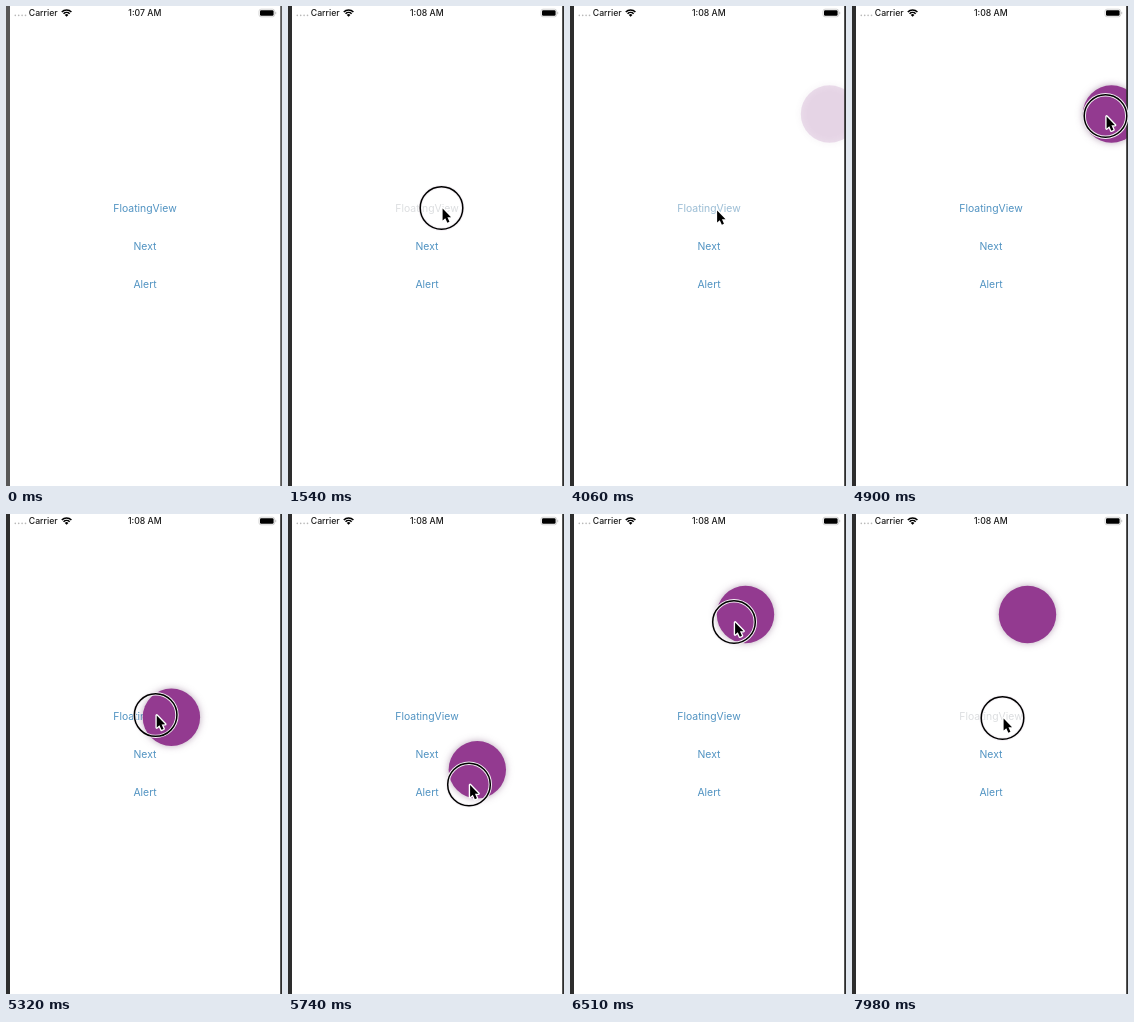
An HTML page with a canvas that plays this animation: 276 px wide and 480 px high, repeating every 8000 ms.

```html
<!DOCTYPE html>
<html lang="en">
<head>
<meta charset="utf-8">
<title>Floating button demo</title>
<style>
  html, body { margin: 0; width: 100%; height: 100%; overflow: hidden; background: #fff; }
  canvas { display: block; width: 276px; height: 480px; }
</style>
</head>
<body>
<canvas id="stage"></canvas>
<script>
const W = 276, H = 480, LOOP = 8000, STEP = 70;
const FONT = 'Inter, "Liberation Sans", sans-serif';
const BLUE = '#5193c2';
const canvas = document.getElementById('stage');
const ctx = canvas.getContext('2d');
const dpr = window.devicePixelRatio || 1;
canvas.width = W * dpr;
canvas.height = H * dpr;

const clamp = v => Math.max(0, Math.min(1, v));
const ease = v => v * v * (3 - 2 * v);
const ramp = (t, start, length) => ease(clamp((t - start) / length));
const mix = (a, b, k) => a + (b - a) * k;

const glide = (start, end, x, y) => ({ start, end, x, y });
const entry = { x: 119, y: 413 };
const glides = [
  glide(350, 420, 109, 366),
  glide(630, 1120, 154, 201.5),
  glide(2100, 2520, 193, 164),
  glide(2590, 3010, 146.5, 203.5),
  glide(4340, 4760, 254, 109.5),
  // Drag: down, up to the corner, down again and back.
  glide(4900, 5180, 174, 255),
  glide(5180, 5600, 82, 45),
  glide(5600, 5740, 181.5, 270),
  glide(5740, 5880, 160, 338),
  glide(5880, 6440, 164.5, 107.5),
  glide(6580, 6930, 140, 224),
  glide(6930, 7280, 162, 168),
  glide(7350, 7840, 151, 203.5)
];
const taps = [[1540, 1680], [3150, 3220], [3850, 3990], [7910, LOOP]];
const drag = [4830, 6580];

const isHeld = (t, [start, end]) => t >= start && t < end;

function cursorAt(t) {
  let { x, y } = entry;
  for (const g of glides) {
    const k = ramp(t, g.start, g.end - g.start);
    x = mix(x, g.x, k);
    y = mix(y, g.y, k);
  }
  return { x, y };
}

// The ball trails the cursor and slips a little when the drag begins.
function ballAt(t) {
  const hand = cursorAt(Math.max(drag[0], Math.min(t, drag[1]) - 15));
  const slip = ramp(t, 4900, 140);
  return { x: hand.x + mix(5.5, 11, slip), y: hand.y + mix(-1.5, -7, slip) };
}

function ballAlpha(t) {
  if (t < 3150) return ramp(t, 1680, 280);
  if (t < 3850) return 1 - ramp(t, 3150, 350);
  return ramp(t, 3990, 280);
}

function label(text, x, y, size, color, align = 'center', weight = 400) {
  ctx.font = `${weight} ${size}px ${FONT}`;
  ctx.textAlign = align;
  ctx.fillStyle = color;
  ctx.fillText(text, x, y);
}

function disc(x, y, r, color) {
  ctx.fillStyle = color;
  ctx.beginPath();
  ctx.arc(x, y, r, 0, Math.PI * 2);
  ctx.fill();
}

function stroke(color, width) {
  ctx.strokeStyle = color;
  ctx.lineWidth = width;
  ctx.stroke();
}

function roundBox(x, y, w, h, r) {
  ctx.beginPath();
  ctx.roundRect(x, y, w, h, r);
}

function drawStatus(t) {
  for (let i = 0; i < 4; i++) disc(9.3 + i * 3.4, 9.4, 0.8, '#b8b8b8');
  label('Carrier', 22.8, 10.2, 8.7, '#1c1c1c', 'left', 450);
  label(t < 700 ? '1:07 AM' : '1:08 AM', 138.8, 10.2, 8.7, '#1c1c1c', 'center', 450);

  const from = -Math.PI * 0.75, to = -Math.PI * 0.25;
  for (const r of [6.8, 4.3]) {
    ctx.beginPath();
    ctx.arc(60.6, 10.8, r, from, to);
    stroke('#000', 1.6);
  }
  ctx.fillStyle = '#000';
  ctx.beginPath();
  ctx.moveTo(60.6, 10.8);
  ctx.arc(60.6, 10.8, 2.6, from, to);
  ctx.fill();

  roundBox(253, 3.2, 15.6, 7.6, 2);
  stroke('#c4c4c4', 0.7);
  ctx.fillStyle = '#000';
  roundBox(254, 4.2, 13.6, 5.6, 1.2);
  ctx.fill();
  ctx.fillStyle = '#c4c4c4';
  ctx.fillRect(269.2, 5.8, 1, 2.4);
}

function drawButtons(t) {
  const tap = taps.findLast(([start]) => t >= start);
  const strength = !tap ? 1 : isHeld(t, tap) ? 0 : ramp(t, tap[1] - STEP, 280);
  ctx.globalAlpha = 1 - strength;
  label('FloatingView', 139, 206, 10.4, '#dcdee0');
  ctx.globalAlpha = strength;
  label('FloatingView', 139, 206, 10.4, BLUE);
  ctx.globalAlpha = 1;
  label('Next', 139, 244, 10.4, BLUE);
  label('Alert', 139, 282, 10.4, BLUE);
}

function drawBall(t) {
  const { x, y } = ballAt(t);
  ctx.save();
  ctx.globalAlpha = ballAlpha(t);
  ctx.shadowColor = 'rgba(120, 80, 120, 0.5)';
  ctx.shadowBlur = 7 * dpr;
  disc(x, y, 28.7, '#933a90');
  ctx.restore();
}

function drawBezel(t) {
  ctx.fillStyle = t < 1540 ? '#575757' : '#2d2d2d';
  ctx.fillRect(0, 0, 4, H);
  ctx.fillRect(274.2, 0, W - 274.2, H);
}

function drawRing(x, y) {
  ctx.beginPath();
  ctx.arc(x - 0.5, y + 0.5, 21.3, 0, Math.PI * 2);
  stroke('#f4f0f4', 3.4);
  stroke('#000', 1.5);
}

function drawArrow(x, y) {
  ctx.save();
  ctx.translate(x + 0.6, y + 1);
  ctx.scale(0.9, 0.9);
  ctx.lineJoin = 'round';
  const arrow = new Path2D('M0 0V13.4L3 10.7L5.3 15.8L7.6 14.8L5.4 9.8L9.4 9.6Z');
  ctx.strokeStyle = '#fff';
  ctx.lineWidth = 3;
  ctx.stroke(arrow);
  ctx.fillStyle = '#000';
  ctx.fill(arrow);
  ctx.restore();
}

function draw(t) {
  ctx.setTransform(dpr, 0, 0, dpr, 0, 0);
  ctx.fillStyle = '#fff';
  ctx.fillRect(0, 0, W, H);
  drawStatus(t);
  drawButtons(t);
  drawBall(t);
  drawBezel(t);
  if (t < 350) return;
  const { x, y } = cursorAt(t);
  if ([...taps, drag].some(span => isHeld(t, span))) drawRing(x, y);
  drawArrow(x, y);
}

const start = performance.now();
function tick() {
  const t = (performance.now() - start) % LOOP;
  draw(Math.floor(t / STEP) * STEP);
  requestAnimationFrame(tick);
}
tick();
</script>
</body>
</html>
```
